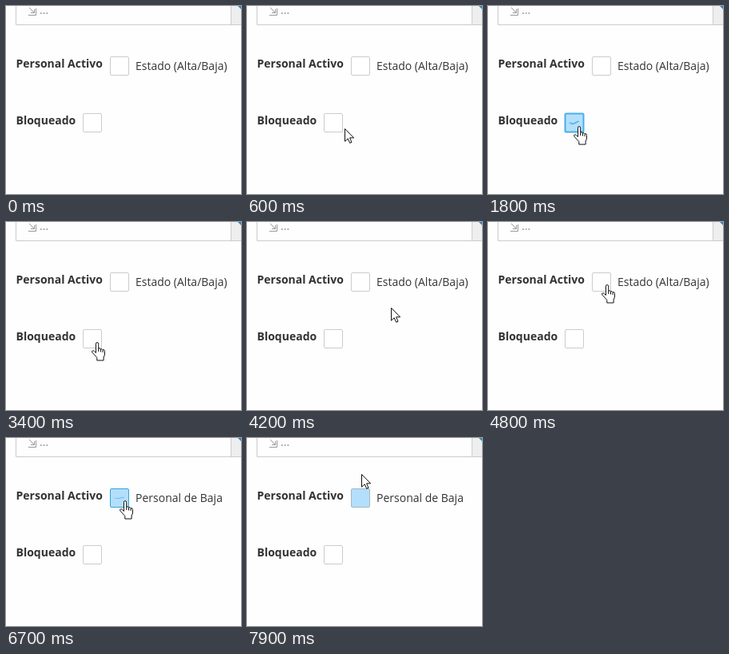
These frames come from a looping animation (294x235 px, 8000 ms). An HTML page:

```html
<!DOCTYPE html>
<html lang="es">
<head>
<meta charset="utf-8">
<title>Casillas</title>
<style>
html, body { margin: 0; width: 100%; height: 100%; overflow: hidden; background: #fefefe; }
svg { display: block; }
text { font: 14px "Open Sans", sans-serif; fill: #333; }
.label { font-weight: 700; }
.line { fill: none; stroke: #ccc; }
.cursor { fill: #fff; stroke: #111; stroke-linejoin: round; }
</style>
</head>
<body>
<svg width="294" height="235" viewBox="0 0 294 235">
  <defs>
    <g id="box">
      <rect x=".5" y=".5" width="23" height="23" rx="1.5"/>
      <path fill="#2f9fe3" d="M5 12.3 7.1 10.2 10 13.1 16.6 6.2 18.7 8.3 10 17.3Z"/>
    </g>
  </defs>

  <path fill="#eee" d="M282 0H294V23H282Z"/>
  <path class="line" d="M12.5 0V23.5H294M281.5 0V23"/>
  <path fill="#2f86c4" d="M290 0H294V4Z"/>
  <path fill="none" stroke="#999" d="M29 2 35 8M31 8.5H35.5V4M37.5 3V11.5H28"/>
  <text x="42" y="10" style="fill:#888">...</text>

  <text class="label" x="12.5" y="77">Personal Activo</text>
  <text class="label" x="12.5" y="148">Bloqueado</text>
  <text id="status" x="162" y="80"></text>

  <g id="active" transform="translate(130 63)"></g>
  <g id="blocked" transform="translate(96 134)"></g>

  <path id="arrow" class="cursor" d="M.5 .5V16.2L4.2 12.8 6.7 18.3 9 17.3 6.6 11.8H11.6Z"/>
  <path id="hand" class="cursor" d="M5.5 13.5V2.2a1.6 1.6 0 0 1 3.2 0V8.2q1.6-1.2 2.8.6q1.7-.9 2.6.9q2.4-.5 2.4 1.8V15q0 2-1.4 4V23H6.8V19.5L1 13.2q-1-1.6.3-2.3q1.2-.5 2.4.9ZM8.7 8.2V12M11.5 8.8V12.5M14.1 9.7V13"/>
</svg>
<script>
const LOOP = 8000;
const $ = id => document.getElementById(id);

// [time, cursor, x, y]
const moves = [
  [0], [100, 'arrow', 293, 49], [300, 'arrow', 220, 106], [400, 'arrow', 174, 148],
  [500, 'arrow', 141, 154], [600, 'arrow', 122, 153], [700, 'hand', 109, 151],
  [800, 'hand', 107, 150], [3500, 'arrow', 116, 152], [4100, 'arrow', 110, 153],
  [4200, 'arrow', 180, 107], [4300, 'arrow', 155, 94], [4700, 'hand', 144, 82],
  [4800, 'hand', 142, 78], [6800, 'hand', 143, 81], [7800, 'arrow', 164, 76],
  [7900, 'arrow', 143, 45]
];

const styles = {
  idle: ['#fff', '#ccc', 1],
  pressed: ['#b3dffb', '#3c9fdf', 1],
  focused: ['#b3dffb', '#4aaeea', 2],
  left: ['#b3dffb', '#a3b8c4', 1]
};

// [time, style, height of the tick]
const boxes = {
  blocked: [
    [0, 'idle', 0], [1000, 'pressed', 0], [1200, 'idle', .3], [1300, 'idle', .6],
    [1400, 'idle', .85], [1500, 'idle', 1], [1800, 'focused', .45],
    [2000, 'focused', 0], [2200, 'idle', 0]
  ],
  active: [
    [0, 'idle', 0], [4900, 'pressed', 0], [5600, 'idle', .4], [5700, 'idle', .8],
    [5800, 'idle', 1], [6500, 'pressed', .75], [6600, 'pressed', .45],
    [6700, 'pressed', .2], [6800, 'left', 0]
  ]
};

const captions = [
  [0, 'Estado (Alta/Baja)'], [4900, 'Personal Activo'], [6500, 'Personal de Baja']
];

const at = (steps, t) => steps.findLast(step => step[0] <= t);

for (const id in boxes) $(id).append(...$('box').cloneNode(true).children);

function drawBox(id, t) {
  const [, style, height] = at(boxes[id], t);
  const [rect, tick] = $(id).children;
  const [fill, stroke, width] = styles[style];
  rect.setAttribute('fill', fill);
  rect.setAttribute('stroke', stroke);
  rect.setAttribute('stroke-width', width);
  tick.setAttribute('transform', `translate(0 12) scale(1 ${height}) translate(0 -12)`);
  tick.setAttribute('opacity', height && style === 'idle' ? 1 : height ? .7 : 0);
}

function draw(now) {
  const t = now % LOOP;
  for (const id in boxes) drawBox(id, t);
  $('status').textContent = at(captions, t)[1];
  const [, kind, x, y] = at(moves, t);
  for (const id of ['arrow', 'hand']) {
    $(id).style.display = id === kind ? '' : 'none';
    if (id === kind) $(id).setAttribute('transform', `translate(${x} ${y})`);
  }
}

let start;
function tick(now) {
  start ??= now;
  draw(now - start);
  requestAnimationFrame(tick);
}
draw(0);
requestAnimationFrame(tick);
</script>
</body>
</html>
```
